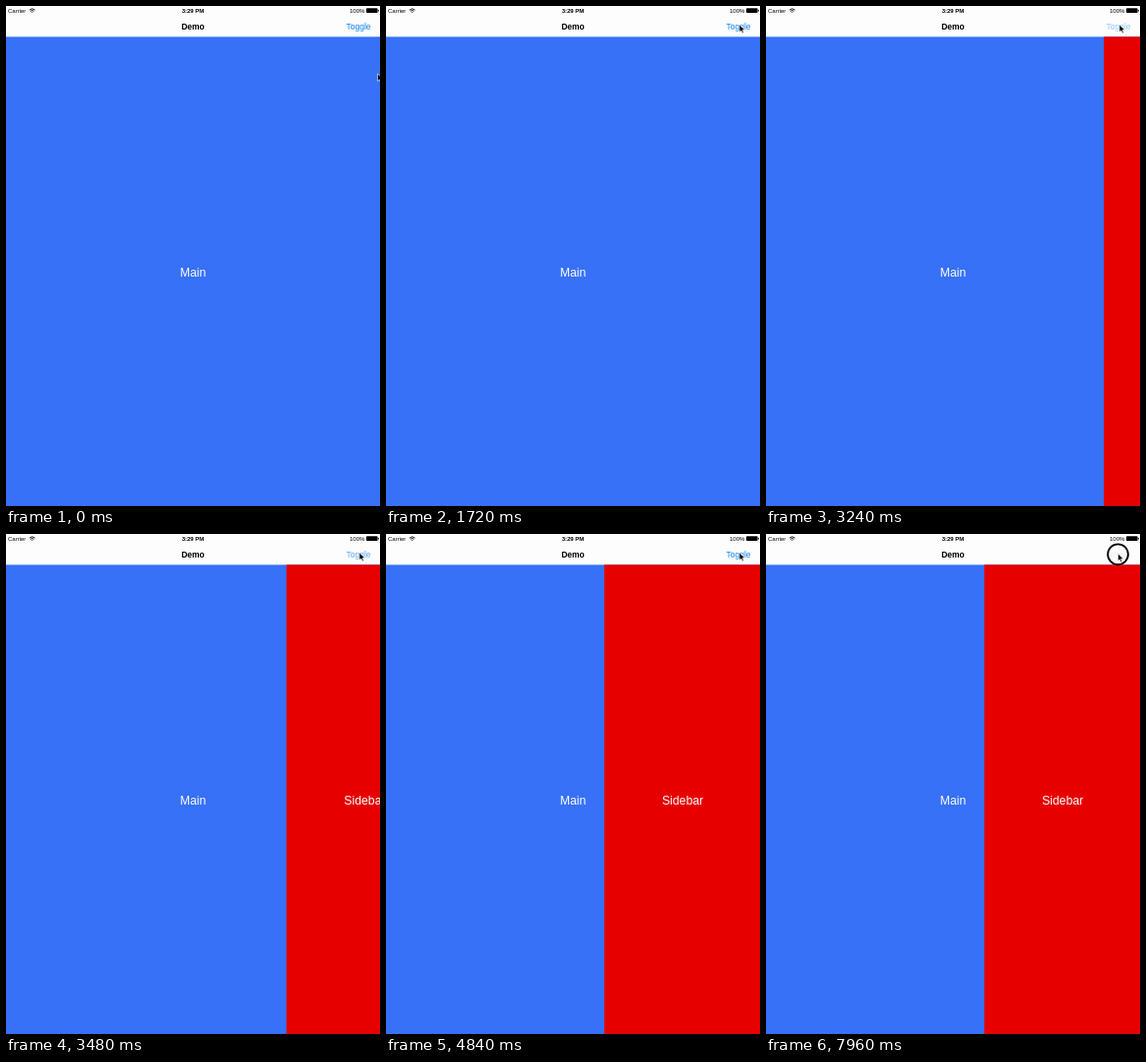
Recreate the animation shown at these times as an HTML page. Size 382 px wide and 510 px high, loop 8000 ms.

```html
<!DOCTYPE html>
<html lang="en">
<head>
<meta charset="utf-8">
<title>Sidebar toggle</title>
<style>
  html, body { margin: 0; width: 100%; height: 100%; overflow: hidden; background: #fdfdfd; }
  svg { display: block; width: 382px; height: 510px; font-family: "Liberation Sans", Arial, sans-serif; }
  .status { font-size: 6px; }
  .title { font-size: 8.5px; }
  .bold { font-weight: bold; }
  .label { font-size: 12.25px; fill: #fff; }
  .mid { text-anchor: middle; }
</style>
</head>
<body>
<svg viewBox="0 0 382 510">
  <rect width="382" height="510" fill="#fdfdfd"/>
  <rect y="31.4" width="382" height="479" fill="#3671f7"/>
  <text class="label mid" x="191" y="276">Main</text>

  <g id="sidebar">
    <rect y="31.4" width="162" height="479" fill="#e60000"/>
    <text class="label mid" x="80" y="276">Sidebar</text>
  </g>

  <text class="status" x="2" y="6.9">Carrier</text>
  <g fill="none" stroke="#000" stroke-width=".9">
    <path d="M24 4.1Q26.8 1.4 29.6 4.1M25.1 5.3Q26.8 3.7 28.5 5.3"/>
    <path d="M26 6.1h1.6l-.8 .9z" fill="#000" stroke="none"/>
  </g>
  <text class="status bold mid" x="191" y="6.9">3:29 PM</text>
  <text class="status" x="351" y="6.9">100%</text>
  <rect x="368" y="2.3" width="11.6" height="4.7" rx=".8"/>
  <rect x="380" y="3.8" width="1" height="1.8" rx=".4"/>

  <text class="title bold mid" x="191" y="23.6">Demo</text>
  <text class="title" id="toggle" x="347.5" y="23.6" fill="#0e82f2">Toggle</text>

  <circle id="ring" r="10.4" fill="none" stroke="#000" stroke-width="1.8"/>
  <path id="cursor" d="M0 0V7.6L1.8 6 3 8.8 4.3 8.2 3.1 5.5H5.5Z" stroke="#fff" stroke-width=".6"/>
</svg>

<script>
const LOOP = 8000;
const PRESS = 2720, RELEASE = 3000, SLIDE = 3030, SECOND_PRESS = 7740;
const CLOSED = 382, OPEN = 223, DIM = 0.08;

// Pointer stops: time, x, y
const stops = [
  [0, 379.5, 69], [820, 362, 8], [900, 362, 8], [1660, 361, 19],
  [5640, 361, 19], [6120, 360, 19.5], [7160, 360, 19.5], [7560, 359.5, 20]
];

const [sidebar, toggle, ring, cursor] =
  ["sidebar", "toggle", "ring", "cursor"].map(id => document.getElementById(id));

const clamp = v => Math.min(1, Math.max(0, v));
const progress = (t, start, length) => clamp((t - start) / length);
const smooth = p => p * p * (3 - 2 * p);
const mix = (a, b, p) => a + (b - a) * p;
const place = (node, x, y) => node.setAttribute("transform", `translate(${x} ${y})`);

function spring(seconds) {
  if (seconds <= 0) return 0;
  const damping = 0.9, speed = 4.2;
  const root = Math.sqrt(1 - damping * damping);
  const angle = root * speed * seconds;
  return 1 - Math.exp(-damping * speed * seconds) *
    (Math.cos(angle) + damping / root * Math.sin(angle));
}

function pointerAt(t) {
  const next = stops.findIndex(stop => stop[0] > t);
  if (next < 0) return stops[stops.length - 1].slice(1);
  const [start, x, y] = stops[next - 1];
  const [end, toX, toY] = stops[next];
  const p = smooth(progress(t, start, end - start));
  return [mix(x, toX, p), mix(y, toY, p)];
}

function toggleOpacity(t) {
  if (t >= SECOND_PRESS) return mix(1, DIM, progress(t, SECOND_PRESS, 160));
  if (t < PRESS) return 1;
  if (t < RELEASE) return mix(1, DIM, progress(t, PRESS, 160));
  const left = 1 - progress(t, RELEASE, 1200);
  return mix(1, DIM, left ** 2.2);
}

function draw(t) {
  const [x, y] = pointerAt(t);
  const pressed = (t >= PRESS && t < RELEASE) || t >= SECOND_PRESS;
  const edge = mix(CLOSED, OPEN, t < 4360 ? spring((t - SLIDE) / 1000) : 1);
  place(sidebar, edge, 0);
  place(cursor, x, y);
  place(ring, x, y + 0.7);
  ring.style.visibility = pressed ? "visible" : "hidden";
  toggle.style.opacity = toggleOpacity(t);
}

const started = performance.now();
function tick() {
  draw((performance.now() - started) % LOOP);
  requestAnimationFrame(tick);
}
tick();
</script>
</body>
</html>
```
